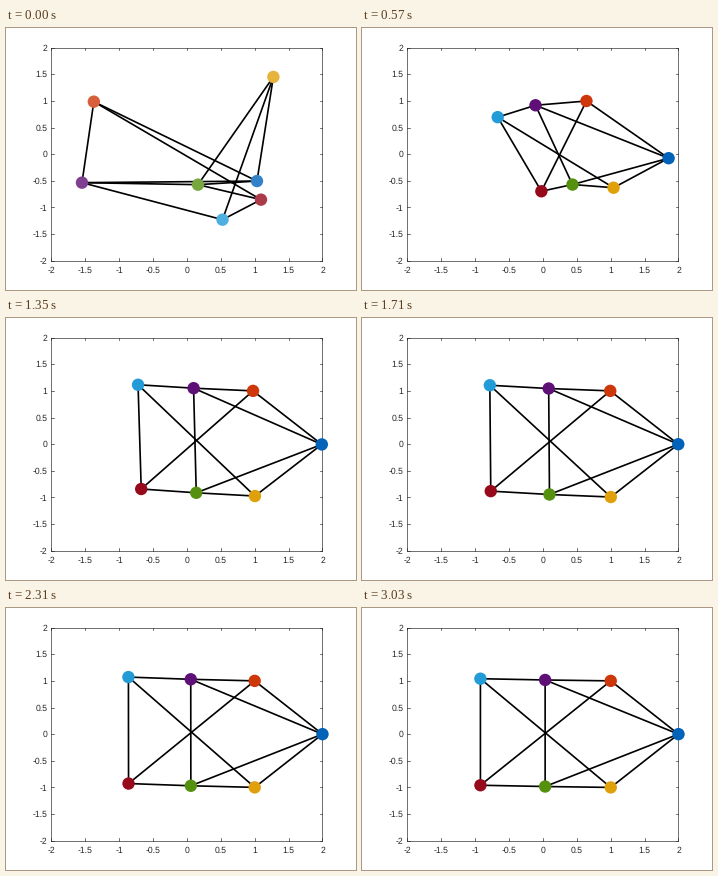
A matplotlib script that plays this animation: 350x262 px, repeating every 3.06 s.

```python
import numpy as np
import matplotlib.pyplot as plt
from matplotlib.animation import FuncAnimation
from matplotlib.collections import LineCollection
from matplotlib.colors import to_rgb

plt.rcParams["text.hinting"] = "none"

W, H, DPI = 350, 262, 100
PX = 72 / DPI
FRAMES, INTERVAL = 102, 30
LEFT, RIGHT, TOP, BOTTOM = 45.49, 316.49, 19.6, 232.7
INK = "#262626"

# Arrow-shaped formation: a tip followed by three mirrored pairs
GOAL = np.array([(2, 0)] + [(x, y) for x in (1, 0, -1) for y in (1, -1)], float)
START = np.array([(1.033, -0.505), (-1.375, 0.985), (1.275, 1.45), (-1.55, -0.535),
                  (0.162, -0.573), (0.524, -1.23), (1.092, -0.854)])
LEADERS, LEADER_RATE = 3, 0.1
COLORS = ["#0062b8", "#cd370a", "#e0a00c", "#5f1076", "#55910f", "#239bd7", "#960a1c"]


def mirror(i):
    return i and (i + 1 if i % 2 else i - 1)


HALF = [(0, 1), (0, 3), (1, 3), (1, 6), (3, 5), (3, 4), (5, 6)]
EDGES = sorted({tuple(sorted(e)) for i, j in HALF
                for e in ((i, j), (mirror(i), mirror(j)))})


def system_matrix():
    """Followers obey the unit-norm equilibrium stress, leaders head home."""
    inc = np.zeros((len(GOAL), len(EDGES)))
    for k, (i, j) in enumerate(EDGES):
        inc[i, k], inc[j, k] = 1, -1
    forces = np.vstack([inc * d for d in (inc.T @ GOAL).T])
    stress = np.linalg.svd(forces)[2][-1]
    stress *= np.sign(stress[0])
    m = inc * stress @ inc.T
    m[:LEADERS] = LEADER_RATE * np.eye(len(GOAL))[:LEADERS]
    return m


RATES, MODES = np.linalg.eig(system_matrix())
AMPS = np.linalg.solve(MODES, START - GOAL)


def to_px(p):
    x = LEFT + (p[..., 0] + 2) / 4 * (RIGHT - LEFT)
    y = BOTTOM - (p[..., 1] + 2) / 4 * (BOTTOM - TOP)
    return np.stack([x, y], axis=-1)


def positions(k):
    t = max(0, k - 0.5) * 1.022
    decay = np.exp(-RATES * t)[:, None]
    return to_px(GOAL + np.real(MODES @ (decay * AMPS)))


fig = plt.figure(figsize=(W / DPI, H / DPI), dpi=DPI, facecolor="white")
ax = fig.add_axes([0, 0, 1, 1])
ax.set(xlim=(0, W), ylim=(H, 0))
ax.axis("off")


def rule(xs, ys):
    ax.plot(xs, ys, color=INK, lw=0.65 * PX, zorder=1)


def label(x, y, value, ha):
    ax.text(x, y, f"{value:g}", ha=ha, va="baseline", color=INK,
            family="Liberation Sans", fontsize=8.7 * PX)


rule([LEFT, RIGHT, RIGHT, LEFT, LEFT], [TOP, TOP, BOTTOM, BOTTOM, TOP])
for v in np.arange(-2, 2.5, 0.5):
    x, y = to_px(np.array([v, v]))
    for edge, step in ((TOP, 2.7), (BOTTOM, -2.7)):
        rule([x, x], [edge, edge + step])
    for edge, step in ((LEFT, 2.7), (RIGHT, -2.7)):
        rule([edge, edge + step], [y, y])
    label(x, 245.2, v, "center")
    label(41.5, y + 3.1, v, "right")

links = LineCollection([], colors="black", linewidths=1.67 * PX, zorder=2)
ax.add_collection(links)
nodes = ax.scatter(*START.T, s=(12.4 * PX) ** 2, linewidths=0, zorder=3)


def draw(k):
    p = positions(k)
    pale = 0 if k else 0.2
    links.set_segments([p[list(edge)] for edge in EDGES])
    nodes.set_offsets(p)
    nodes.set_facecolor([np.array(to_rgb(c)) * (1 - pale) + pale for c in COLORS])
    return links, nodes


anim = FuncAnimation(fig, draw, frames=FRAMES, interval=INTERVAL,
                     repeat=True, repeat_delay=0)
plt.show()
```
